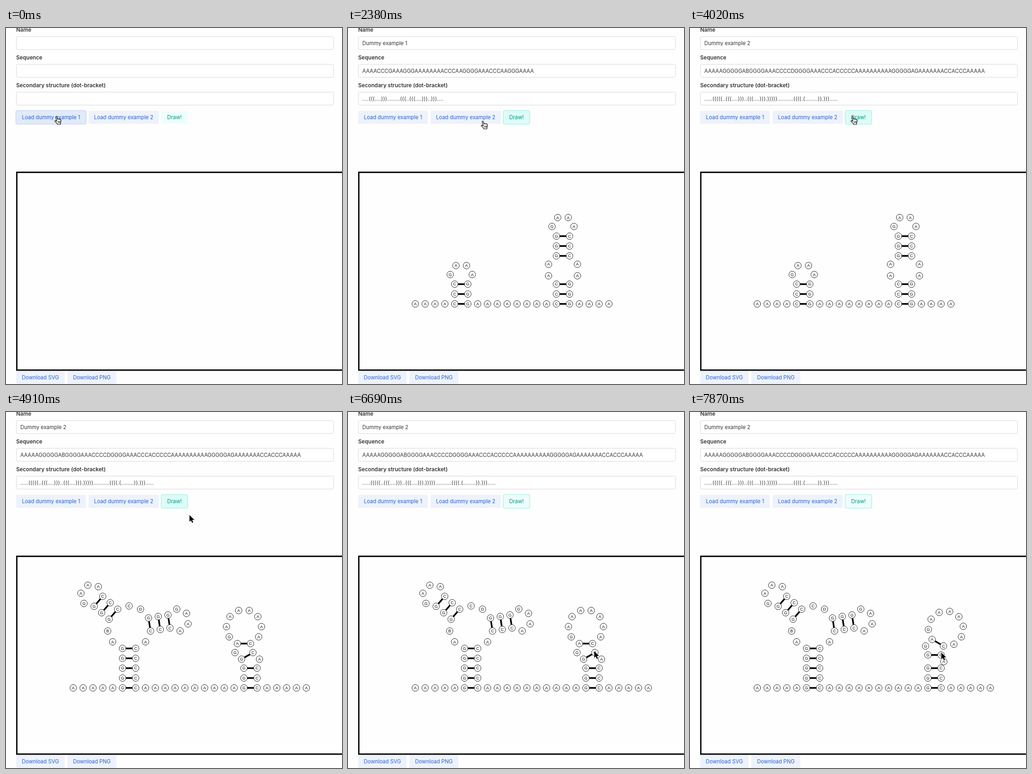
These frames come from a looping animation (728x769 px, 8000 ms). An HTML page:

```html
<!DOCTYPE html>
<html lang="en">
<head>
<meta charset="utf-8">
<title>Secondary structure drawing</title>
<style>
  html, body { margin: 0; width: 100%; height: 100%; overflow: hidden; background: #fefefe; }
  svg { display: block; }
  text { font: 11.38px Inter, "Open Sans", sans-serif; fill: #363636; }
  .label { font-size: 11.7px; font-weight: 600; }
  .field { fill: #fff; stroke: #d8d8d8; }
  .link { fill: #2b62cd; }
  .go { fill: #00947e; }
  .middle, .node text { text-anchor: middle; }
  #dots { letter-spacing: .2px; }
  .node circle { fill: #fefefe; stroke: #222; stroke-width: 1; }
  .node text { font: 9px "Liberation Sans", Arial, sans-serif; fill: #111; }
  .bond { stroke: #000; stroke-width: 3.55; }
</style>
</head>
<body>
<svg id="stage" width="728" height="769" viewBox="0 0 728 769">
  <g id="form"></g>
  <path d="M760 311.7H23.4V739H760" fill="none" stroke="#000" stroke-width="2.85"/>
  <g id="drawing"></g>
  <g id="hand" stroke-linejoin="round" stroke-linecap="round">
    <path d="M5.2 11.5L2.7 3.3C2 1 4.6.3 5.2 2.4L6.7 7.2C7.4 5.8 9 6 9.3 7.2C10.3 6.2 11.6 6.7 11.8 7.7C13 7.1 14 7.8 14.1 9C14.4 11 14.2 13 13 15V18H6.5C6 16 3.5 14 1.2 11.8C.2 10.6 1.8 9.4 3.2 10.2Z" fill="#fff" stroke="#000" stroke-width="1.2"/>
    <path d="M8 11.6v3.3M10 11.4v3.5M12 11.2v3.5" stroke="#000" stroke-width=".9"/>
  </g>
  <path id="arrow" d="M0 0v14.5l3.3-3.1 2.3 5.3 2.4-1-2.2-5.2h4.7z" fill="#000" stroke="#fff" stroke-width="1.2" paint-order="stroke"/>
</svg>
<script>
const LOOP = 8000;
const STEP = 21.333, PAIR = STEP * 4 / 3;
const el = id => document.getElementById(id);

const examples = [
  { name: '', seq: '', dots: '' },
  { name: 'Dummy example 1',
    seq: 'AAAACCCGAAAGGGAAAAAAAACCCAAGGGGAAACCCAAGGGAAAA',
    dots: '....(((....)))........(((..(((....)))..)))....' },
  { name: 'Dummy example 2',
    seq: 'AAAAAGGGGGABGGGGAAACCCCDGGGGAAACCCACCCCCAAAAAAAAAAGGGGGAGAAAAAAACCACCCAAAAA',
    dots: '.....(((((..(((....)))..(((....))).)))))..........((((.(........)).))).....' }
];

// ---- form ----
const link = { css: 'link', base: '#edf2fc', hover: '#e1eafa', ring: '#c3d4f2' };
const go = { css: 'go', base: '#ebfffc', hover: '#dafdf8', ring: '#aaf0e4' };
const buttons = [
  { id: 'load1', x: 22, y: 179, w: 151, text: 'Load dummy example 1', ...link },
  { id: 'load2', x: 179, y: 179, w: 152, text: 'Load dummy example 2', ...link },
  { id: 'draw', x: 337, y: 179, w: 56, text: 'Draw!', ...go },
  { id: 'svg', x: 22, y: 741, w: 105, text: 'Download SVG', ...link },
  { id: 'png', x: 133, y: 741, w: 106, text: 'Download PNG', ...link }
];

const field = (id, label, y) => `
  <text class="label" x="22" y="${y - 10.5}">${label}</text>
  <rect class="field" x="22.5" y="${y}" width="687" height="28" rx="2.8"/>
  <text id="${id}" x="31" y="${y + 18.8}"></text>`;

const button = b => `
  <rect id="${b.id}" x="${b.x}" y="${b.y}" width="${b.w}" height="28" rx="2.8"/>
  <rect id="${b.id}Ring" x="${b.x - .6}" y="${b.y - .6}" width="${b.w + 1.2}" height="29.2"
    rx="3.4" fill="none" stroke="${b.ring}" stroke-width="1.4"/>
  <text class="middle ${b.css}" x="${b.x + b.w / 2}" y="${b.y + 18}">${b.text}</text>`;

el('form').innerHTML = field('name', 'Name', 18.5) + field('seq', 'Sequence', 78.5) +
  field('dots', 'Secondary structure (dot-bracket)', 138.5) + buttons.map(button).join('');

// ---- structure layout ----
function matchPairs(dots) {
  const open = [], mate = [];
  [...dots].forEach((c, i) => {
    if (c === '(') open.push(i);
    if (c === ')') { const j = open.pop(); mate[j] = i; mate[i] = j; }
  });
  return mate;
}

function layout(dots, twist) {
  const mate = matchPairs(dots), at = [];
  const polar = (p, r, a) => ({ x: p.x + r * Math.cos(a), y: p.y + r * Math.sin(a) });

  function stem(i, mid, dir) {
    const j = mate[i];
    at[i] = polar(mid, PAIR / 2, dir - Math.PI / 2);
    at[j] = polar(mid, PAIR / 2, dir + Math.PI / 2);
    if (mate[i + 1] === j - 1) stem(i + 1, polar(mid, STEP, dir), dir);
    else loop(i, j, mid, dir);
  }

  function loop(i, j, mid, dir) {
    const items = [];
    for (let k = i + 1; k < j; k = (mate[k] ?? k) + 1) items.push(k);
    const stems = items.filter(k => mate[k] !== undefined).length + 1;
    const gaps = items.length + 1;
    const bulge = stems === 2 && gaps === 3;
    const r = bulge ? PAIR / Math.SQRT2 : 6.28 * stems + 3.52 * gaps;
    const half = Math.asin(PAIR / 2 / r), inner = r * Math.cos(half);
    const gap = (2 * Math.PI - 2 * half * stems) / gaps;
    const centre = polar(mid, inner, dir);
    // a turned stem takes room from the gaps after it and leaves it before it
    const turn = bulge && mate[items[0]] === j - 2 ? twist : 0;
    let a = dir + Math.PI + half, step = gap + turn;
    for (const k of items) {
      a += step;
      if (mate[k] === undefined) at[k] = polar(centre, r, a);
      else {
        stem(k, polar(centre, inner, a + half), a + half);
        a += 2 * half;
        step = gap - turn / 2;
      }
    }
  }

  let x = 145.8;
  const y = 596;
  for (let i = 0; i < dots.length; i++) {
    if (mate[i] === undefined) at[i] = { x, y };
    else {
      stem(i, { x: x + PAIR / 2, y }, -Math.PI / 2);
      x += PAIR;
      i = mate[i];
    }
    x += STEP;
  }
  return { at, mate };
}

function structure({ seq, dots }, twist) {
  const { at, mate } = layout(dots, twist);
  const n = v => v.toFixed(2);
  const bonds = at.map((p, i) => {
    const q = at[mate[i]];
    return mate[i] > i ? `<line class="bond" x1="${n(p.x)}" y1="${n(p.y)}" x2="${n(q.x)}" y2="${n(q.y)}"/>` : '';
  });
  const nodes = at.map((p, i) => `<g class="node" transform="translate(${n(p.x)} ${n(p.y)})">
    <circle r="7.2"/><text y="3.1">${seq[i]}</text></g>`);
  return bonds.join('') + nodes.join('');
}

const tickAt = t => Math.floor((t - 290) / 148.5);
const handPath = [[4, 105, 190], [5, 140, 192], [6, 235, 200], [7, 308, 203], [8, 340, 199],
  [9, 356, 192], [13, 356, 192], [14, 288, 200], [15, 282, 197], [17, 285, 192], [20, 285, 192],
  [21, 314, 194], [22, 335, 193], [24, 348, 190]];
const arrowPath = [[31, 397.5, 222.5], [33, 440, 310], [36, 520, 480], [38, 532, 513],
  [39, 533.5, 517], [43, 533.5, 516.5], [51, 544.5, 519.5]];

function along(path, k) {
  const next = path.findIndex(p => p[0] > k);
  if (next < 1) return (next ? path[path.length - 1] : path[0]).slice(1);
  const [a, b] = [path[next - 1], path[next]];
  const u = (k - a[0]) / (b[0] - a[0]);
  return [a[1] + (b[1] - a[1]) * u, a[2] + (b[2] - a[2]) * u];
}

// value of the last entry [tick, value] already reached
const latest = (list, k) => list.reduce((v, [from, value]) => k >= from ? value : v, null);

const filled = [[-9, 0], [0, 1], [18, 2]];
const drawn = [[-9, 0], [11, 1], [26, 2]];
const focused = [[-9, 'load1'], [10, 'draw'], [17, 'load2'], [25, 'draw']];
const hovered = [[-9, 'load1'], [6, ''], [7, 'load2'], [8, ''], [9, 'draw'], [15, 'load2'],
  [22, ''], [24, 'draw'], [32, '']];

function twistAt(k) {
  const p = Math.min(1, Math.max(0, (k - 43) / 8));
  return Math.PI / 6 * (p - Math.sin(2 * Math.PI * p) / (4 * Math.PI));
}

let shown = null;
function render(t) {
  const k = tickAt(t);
  if (k === shown) return;
  shown = k;

  const example = examples[latest(filled, k)];
  for (const id of ['name', 'seq', 'dots']) el(id).textContent = example[id];

  const hover = latest(hovered, k), focus = latest(focused, k);
  for (const b of buttons) {
    el(b.id).setAttribute('fill', b.id === hover ? b.hover : b.base);
    el(b.id + 'Ring').setAttribute('visibility', b.id === focus ? 'visible' : 'hidden');
  }

  el('drawing').innerHTML = structure(examples[latest(drawn, k)], twistAt(k));

  const pointing = k < 31;
  for (const [id, path, on] of [['hand', handPath, pointing], ['arrow', arrowPath, !pointing]]) {
    el(id).setAttribute('transform', `translate(${along(path, k)})`);
    el(id).setAttribute('visibility', on ? 'visible' : 'hidden');
  }
}

const start = performance.now();
function frame() {
  render((performance.now() - start) % LOOP);
  requestAnimationFrame(frame);
}
frame();
</script>
</body>
</html>
```
